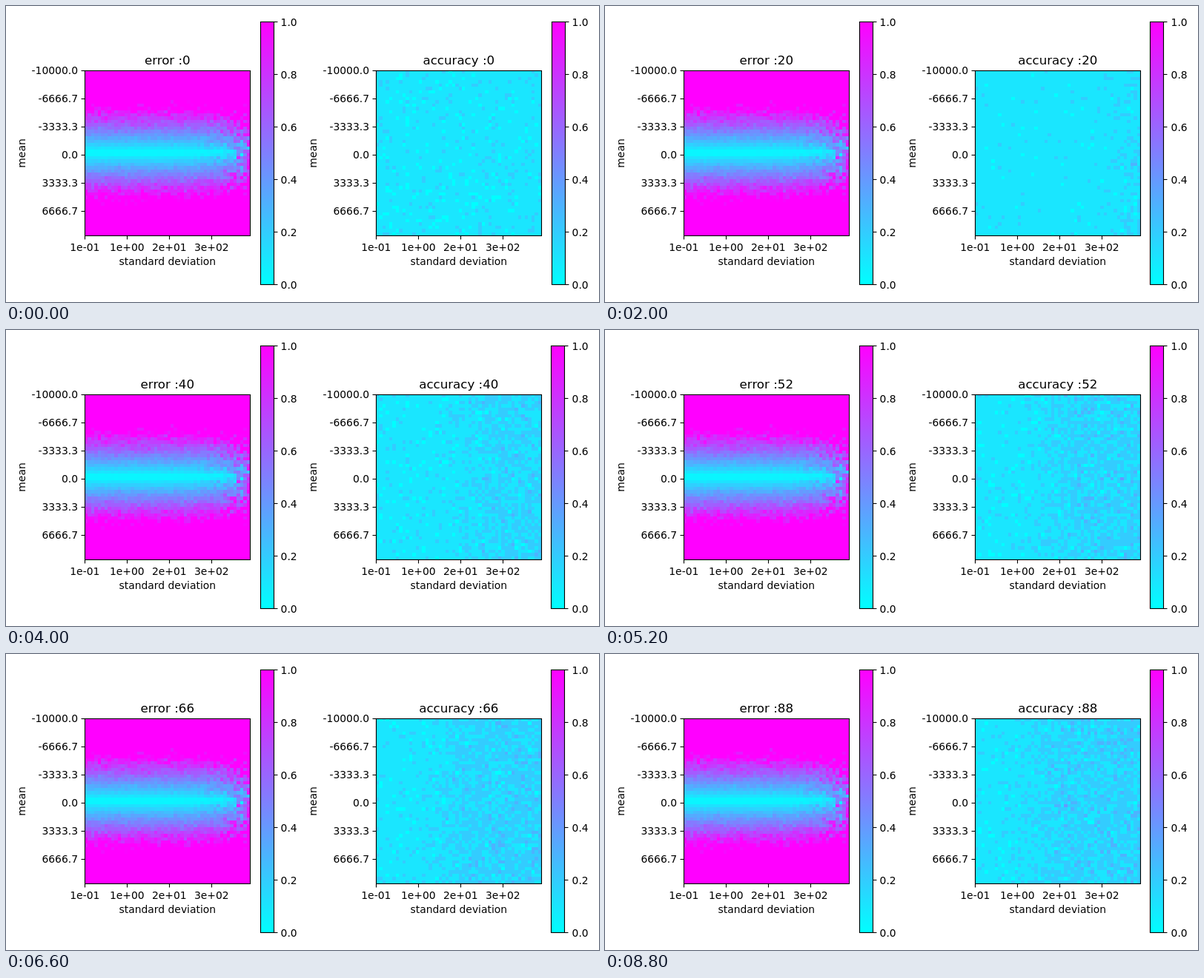
These frames come from a looping animation (800 px wide and 400 px high, 8900 ms). An HTML page with a canvas:

```html
<!DOCTYPE html>
<html>
<head>
<meta charset="utf-8">
<style>
  html, body { margin: 0; width: 100%; height: 100%; overflow: hidden; background: #fff; }
  canvas { display: block; }
</style>
</head>
<body>
<canvas id="stage" width="800" height="400"></canvas>
<script>
const ctx = document.getElementById('stage').getContext('2d');
const STEPS = 89, STEP_MS = 100, CELLS = 50, SIZE = 223, LEFT = 106, TOP = 87;

function randomSource(seed) {
  let state = seed * 7919 + 17;
  return () => {
    state = (state + 0x6D2B79F5) | 0;
    let t = Math.imul(state ^ (state >>> 15), state | 1);
    t ^= t + Math.imul(t ^ (t >>> 7), t | 61);
    return ((t ^ (t >>> 14)) >>> 0) / 4294967296;
  };
}

function normalSource(seed) {
  const random = randomSource(seed);
  return () => Math.sqrt(-2 * Math.log(1 - random())) * Math.cos(2 * Math.PI * random());
}

const clamp = v => Math.min(1, Math.max(0, v));
const smooth = v => { v = clamp(v); return v * v * (3 - 2 * v); };
const color = v => `rgb(${Math.round(255 * v)},${Math.round(255 * (1 - v))},255)`;

// Distance from zero mean, plus spread that grows with the standard deviation
function errorField(step) {
  const fixed = normalSource(5), drift = normalSource(step + 200);
  return (row, col) => {
    const mean = Math.abs(row - 24.5) * 408;
    const sigma = 0.1 * Math.pow(14.2, col / 12.8);
    const scale = 1 + 0.08 * fixed() + 0.015 * drift();
    return clamp((mean * scale + 1.3 * sigma * Math.abs(fixed())) / 5500);
  };
}

// Tenths around 0.1; the higher values spread leftwards as the steps go on
function accuracyField(step) {
  const normal = normalSource(step + 500);
  const start = 4 + 60 * Math.exp(-step / 25);
  const gain = 0.75 * (1 - Math.exp(-step / 25));
  const calm = 0.1 * Math.exp(-(((step - 18) / 10) ** 2));
  return (row, col) => {
    const rise = smooth((col - start) / 25);
    const value = 1 + gain * rise + (0.35 - calm + 0.22 * rise) * normal();
    return clamp(Math.round(value) / 10);
  };
}

function text(label, x, y, align, size = 13.89) {
  ctx.font = `${size}px "DejaVu Sans", sans-serif`;
  ctx.textAlign = align;
  ctx.fillText(label, x, y);
}

function line(x1, y1, x2, y2) {
  ctx.beginPath();
  ctx.moveTo(x1, y1);
  ctx.lineTo(x2, y2);
  ctx.stroke();
}

function drawHeatmap(x, field) {
  const edge = i => Math.round(i * SIZE / CELLS);
  for (let row = 0; row < CELLS; row++) {
    for (let col = 0; col < CELLS; col++) {
      ctx.fillStyle = color(field(row, col));
      ctx.fillRect(x + edge(col), TOP + edge(row),
        edge(col + 1) - edge(col) + 1, edge(row + 1) - edge(row) + 1);
    }
  }
  ctx.fillStyle = '#000';
  ctx.strokeRect(x + 0.5, TOP + 0.5, SIZE, SIZE);
}

function drawColorbar(x, labelX) {
  const gradient = ctx.createLinearGradient(0, 376.5, 0, 21.5);
  gradient.addColorStop(0, color(0));
  gradient.addColorStop(1, color(1));
  ctx.fillStyle = gradient;
  ctx.fillRect(x + 0.5, 21.5, 18, 355);
  ctx.strokeRect(x + 0.5, 21.5, 18, 355);
  ctx.fillStyle = '#000';
  for (let i = 0; i <= 5; i++) {
    const y = Math.round(376 - 71 * i);
    line(x + 18.5, y + 0.5, x + 23.5, y + 0.5);
    text((i / 5).toFixed(1), labelX, y + 5.5, 'left');
  }
}

function drawPanel(x, barX, title, field) {
  drawHeatmap(x, field);
  ['-10000.0', '-6666.7', '-3333.3', '0.0', '3333.3', '6666.7'].forEach((label, i) => {
    const y = TOP + 38 * i;
    line(x - 4.5, y + 0.5, x + 0.5, y + 0.5);
    text(label, x - 9, y + 5.3, 'right');
  });
  ['1e-01', '1e+00', '2e+01', '3e+02'].forEach((label, i) => {
    const tick = x + 57 * i;
    line(tick + 0.5, 310.5, tick + 0.5, 315.5);
    text(label, tick + 0.3, 331, 'center');
  });
  text(title, x + 111.8, 79, 'center', 16.67);
  text('standard deviation', x + 111.8, 350, 'center');
  ctx.save();
  ctx.translate(x - 80, 199);
  ctx.rotate(-Math.PI / 2);
  text('mean', 0, 0, 'center');
  ctx.restore();
  drawColorbar(barX, x + 264.6);
}

function drawStep(step) {
  ctx.fillStyle = '#fff';
  ctx.fillRect(0, 0, 800, 400);
  ctx.strokeStyle = '#000';
  ctx.lineWidth = 1.11;
  drawPanel(LEFT, 343, `error :${step}`, errorField(step));
  drawPanel(LEFT + 393, step < 10 ? 736 : 735, `accuracy :${step}`, accuracyField(step));
}

let shown = -1;
function tick() {
  const step = Math.floor(performance.now() / STEP_MS) % STEPS;
  if (step !== shown) drawStep(shown = step);
  requestAnimationFrame(tick);
}
tick();
</script>
</body>
</html>
```
